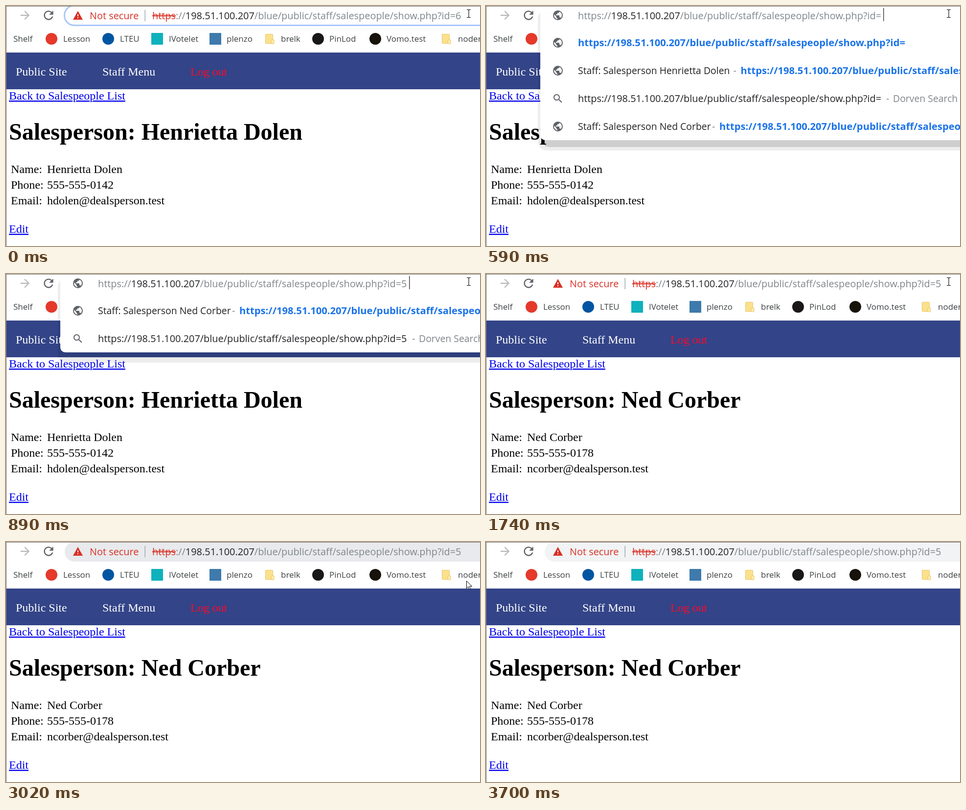
An HTML page that plays this animation: 969 px wide and 490 px high, repeating every 3980 ms.

```html
<!DOCTYPE html>
<html lang="en">
<head>
<meta charset="utf-8">
<title>Salesperson page</title>
<style>
  html, body { margin: 0; width: 100%; height: 100%; overflow: hidden; background: #fff; }
  svg { display: block; }
  text { font: 19.9px "Open Sans", "Noto Sans", sans-serif; font-variant-ligatures: none; fill: #202124; white-space: pre; }
  .mark { font-size: 17px; fill: #3c4043; }
  .title { font-size: 19.4px; }
  .grey { fill: #80868b; }
  .red { fill: #d93025; }
  .strike { fill: #d93025; text-decoration: line-through; }
  .blue { fill: #1a73e8; font-weight: 700; font-size: 20.2px; }
  .page, .nav, .link, .out, .head { font: 24px "Liberation Serif", "Times New Roman", serif; fill: #000; }
  .nav { fill: #fff; }
  .out { fill: #fb0a2a; }
  .link { fill: #00e; text-decoration: underline; }
  .head { font-size: 48px; font-weight: 700; }
</style>
</head>
<body>
<svg id="stage" width="969" height="490" viewBox="0 0 969 490"></svg>
<script>
const LOOP = 3980;
const stage = document.getElementById('stage');
const HOST = '198.51.100.207';
const PATH = '/blue/public/staff/salespeople/show.php?id=';
const FULL = 'https://' + HOST + PATH;
const GREY = '#5f6368';

const ICONS = {
  globe: 'M12 2a10 10 0 1 0 0 20 10 10 0 0 0 0-20zm-1 17.9A8 8 0 0 1 4.2 10.2L9 15v1a2 2 0 0 0 2 2zm6.9-2.5A2 2 0 0 0 16 16h-1v-3a1 1 0 0 0-1-1H8v-2h2a1 1 0 0 0 1-1V7h2a2 2 0 0 0 2-2v-.4a8 8 0 0 1 2.9 12.8z',
  reload: 'M17.65 6.35A8 8 0 1 0 19.73 14h-2.08A6 6 0 1 1 12 6c1.66 0 3.14.69 4.22 1.78L13 11h7V4z',
  forward: 'M4 11v2h12.2l-5.6 5.6L12 20l8-8-8-8-1.4 1.4 5.6 5.6z',
  close: 'M19 6.4L17.6 5 12 10.6 6.4 5 5 6.4 10.6 12 5 17.6 6.4 19 12 13.4 17.6 19 19 17.6 13.4 12z',
  info: 'M11 17h2v-6h-2zm0-8h2V7h-2zm1-7a10 10 0 1 0 0 20 10 10 0 0 0 0-20zm0 18a8 8 0 1 1 0-16 8 8 0 0 1 0 16z',
  search: 'M15.5 14h-.8l-.3-.3a6.5 6.5 0 1 0-.7.7l.3.3v.8l5 5 1.5-1.5zm-6 0a4.5 4.5 0 1 1 0-9 4.5 4.5 0 0 1 0 9z',
  warning: 'M2 21h20L12 3zm11-3h-2v-2h2zm0-4h-2v-4h2z'
};

const at = (from, to, ...parts) => `<g data-from="${from}" data-to="${to}">${parts.join('')}</g>`;
const text = (x, y, s, cls = '') => `<text x="${x}" y="${y}" class="${cls}">${s}</text>`;
const span = (s, cls) => `<tspan class="${cls}">${s}</tspan>`;
const rect = (x, y, w, h, fill, r = 0, more = '') =>
  `<rect x="${x}" y="${y}" width="${w}" height="${h}" fill="${fill}" rx="${r}" ${more}/>`;
const dot = (x, fill) => `<circle cx="${x}" cy="67" r="12" fill="${fill}"/>`;
const icon = (name, x, y, fill = GREY, size = 1) =>
  `<path d="${ICONS[name]}" fill="${fill}" transform="translate(${x} ${y}) scale(${size}) translate(-12 -12)"/>`;
const folder = x => rect(x + .5, 57.5, 15, 19, '#fbe08d', 1, 'stroke="#e9c766"') +
  rect(x + 12, 69, 6, 8, '#fdeaa8', 1, 'stroke="#e9c766"');

const address = (x, id) => text(x, 27, span('https://', 'grey') + HOST + span(PATH + id, 'grey'));
const insecure = id => icon('warning', 147, 19, '#d93025') + text(171, 27, 'Not secure', 'red') +
  rect(283.5, 8, 1.5, 23, '#a5a8ac') +
  text(299, 27, span('https', 'strike') + span('://', 'grey') + HOST + span(PATH + id, 'grey'));
const editing = (id, caret) => rect(111, 1, 858, 40, '#fff') + icon('globe', 147, 19) +
  address(188, id) + rect(caret, 4, 1.5, 27, '#444');

// Suggestion list with its soft drop shadow
const panel = (bottom, shade, ...rows) =>
  rect(106, 8, 900, bottom + 13, `rgba(0,0,0,.07)`, 18) +
  rect(113, 8, 900, bottom + 6, `rgba(0,0,0,${shade})`, 16) +
  `<path d="M111 14q0-13 10-13H969V${bottom}H123q-12 0-12-12z" fill="#fff"/>` + rows.join('');
const visit = (y, title, dashX) => icon('globe', 147, y) + text(188, y + 7, title, 'title') +
  text(dashX, y + 7, '-', 'grey') + text(dashX + 15, y + 7, FULL, 'blue');
const search = (y, id, dashX) => icon('search', 147, y) + text(188, y + 7, FULL + id) +
  text(dashX, y + 7, '-', 'grey') + text(dashX + 14, y + 7, 'Dorven Search', 'grey title');

const person = (name, phone, email) => text(6, 273, 'Salesperson: ' + name, 'head') +
  [['Name:', name], ['Phone:', phone], ['Email:', email]].map(([label, value], i) =>
    text(10, 341 + 32 * i, label, 'page') + text(84, 341 + 32 * i, value, 'page')).join('');

const bookmarks = [[15, 'Shelf'], [117, 'Lesson'], [233, 'LTEU'], [333, 'IVotelet'], [451, 'plenzo'],
  [562, 'brelk'], [661, 'PinLod'], [778, 'Vomo.test'], [924, 'nodery']];

const pill = fill => rect(120, 0, 900, 40, fill, 20);
const arrow = (x, y) => `<path transform="translate(${x + .5} ${y + .5})" fill="#fff" stroke="#000"
  d="M0 0V15L3.5 11.7 6 17.3 8.3 16.3 6 11H11z"/>`;
const beam = 'M942 7.5h3l1 1 1-1h3M946 8.5v14M942 23.5h3l1-1 1 1h3';
const first = 'Henrietta Dolen', second = 'Ned Corber';

const pointer = [[3020, 941, 79], [3140, 919, 229], [3290, 880, 388], [3440, 893, 437], [3560, 911, 475], [3700]];

stage.innerHTML = [
  rect(0, 95, 969, 75, '#334488'),
  text(20, 142, 'Public Site', 'nav'), text(197, 142, 'Staff Menu', 'nav'), text(377, 142, 'Log out', 'out'),
  text(6, 191, 'Back to Salespeople List', 'link'), text(6, 463, 'Edit', 'link'),
  at(0, 1740, person(first, '555-555-0142', 'hdolen@dealsperson.test')),
  at(1740, LOOP, person(second, '555-555-0178', 'ncorber@dealsperson.test')),

  dot(93, '#e4392b'), dot(209, '#0055a2'), rect(297, 55, 24, 24, '#0fb1bd'), rect(416, 55, 24, 24, '#3e7aab'),
  folder(530), dot(638, '#191717'), dot(755, '#17130a'), folder(891),
  ...bookmarks.map(([x, name]) => text(x, 73, name, 'mark')),

  icon('forward', 39, 19, '#b8babd', 1.15),
  at(0, 1440, icon('reload', 87, 19, GREY, 1.2)),
  at(1440, 1740, icon('close', 87, 19, GREY, 1.2)),
  at(1740, LOOP, icon('reload', 87, 19, GREY, 1.2)),

  at(0, 430, rect(119.5, -1, 900, 40.5, '#fff', 20, 'stroke="#a9c7fa" stroke-width="3"'), insecure(6)),
  at(590, 890, panel(274, .13,
    icon('globe', 147, 75) + text(188, 82, FULL, 'blue'),
    visit(132, 'Staff: Salesperson ' + first, 505.5),
    search(189, '', 818),
    visit(246, 'Staff: Salesperson ' + second, 462))),
  at(890, 1440, panel(160, .02,
    visit(75, 'Staff: Salesperson ' + second, 462),
    search(132, 5, 830))),
  at(430, 890, editing('', 812)),
  at(890, 1440, editing(5, 824)),
  at(1440, 1740, icon('info', 147, 19), address(171, 5)),
  at(3020, 3140, pill('#e8eaed')),
  at(3140, 3290, pill('#eeeff1')),
  at(3290, LOOP, pill('#f1f3f4')),
  at(1740, LOOP, insecure(5)),

  rect(0, 0, 969, 1, '#777'), rect(0, 0, 1, 490, '#777'),
  at(0, 3020, `<path d="${beam}" fill="none" stroke="#111" stroke-width="1.2"/>`),
  ...pointer.slice(0, -1).map(([from, x, y], i) => at(from, pointer[i + 1][0], arrow(x, y)))
].join('');

const timed = [...stage.querySelectorAll('[data-from]')];
function draw() {
  const t = performance.now() % LOOP;
  for (const g of timed) g.style.display = t >= +g.dataset.from && t < +g.dataset.to ? '' : 'none';
  requestAnimationFrame(draw);
}
draw();
</script>
</body>
</html>
```
